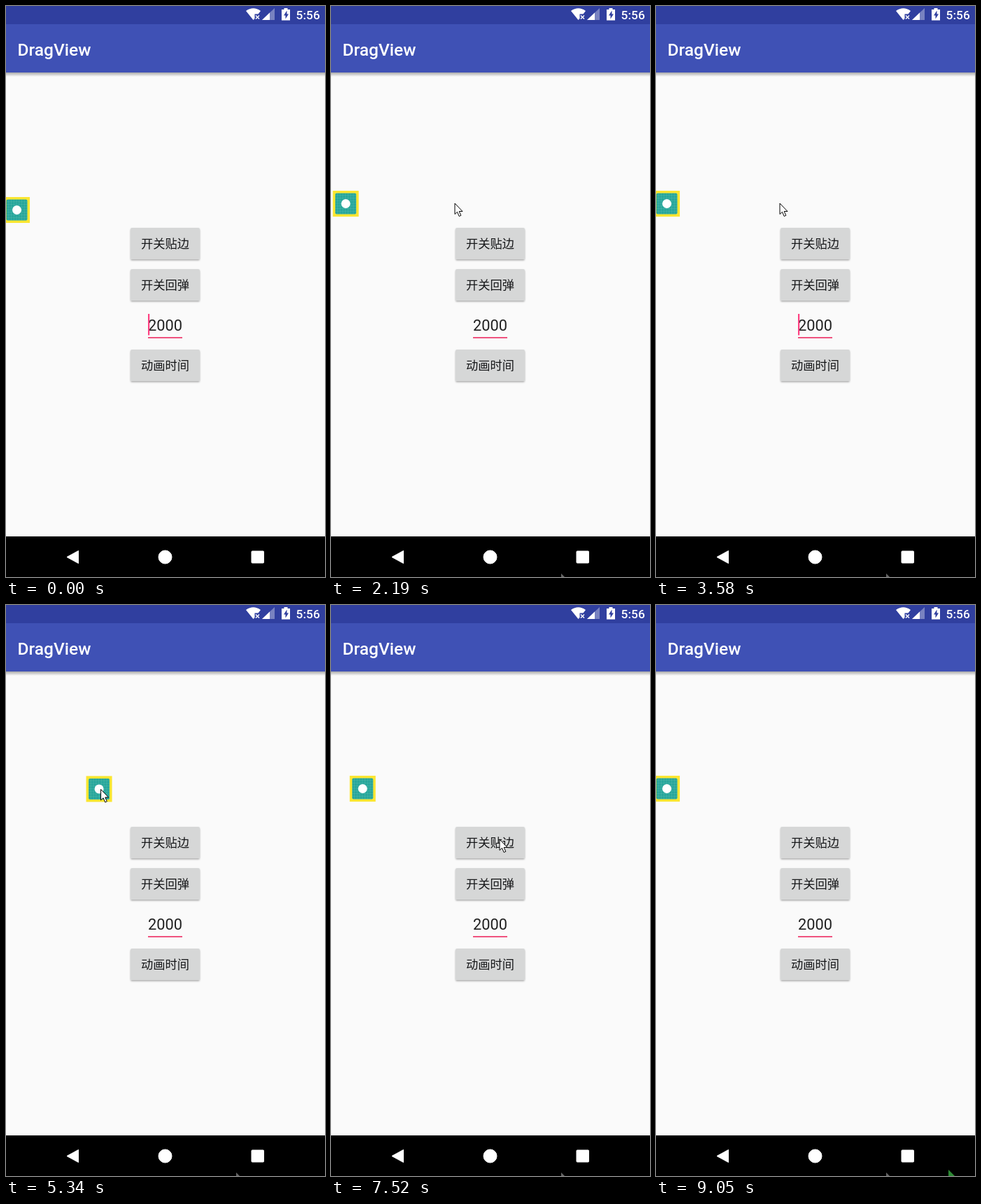
These frames come from a looping animation (456x816 px, 9330 ms). An HTML page:

```html
<!DOCTYPE html>
<html lang="zh">
<head>
<meta charset="utf-8">
<title>DragView</title>
<style>
  html, body { margin: 0; width: 100%; height: 100%; overflow: hidden; background: #fafafa; }
  svg { display: block; width: 456px; height: 816px; font-family: Roboto, sans-serif; }
  .label { font: 17.25px "Noto Sans CJK SC", "Noto Sans CJK", sans-serif; fill: #17181a; text-anchor: middle; }
</style>
</head>
<body>
<svg viewBox="0 0 456 816">
  <defs>
    <linearGradient id="shade" x2="0" y2="1">
      <stop stop-color="#000" stop-opacity=".32"/>
      <stop offset="1" stop-color="#000" stop-opacity="0"/>
    </linearGradient>
    <filter id="lift" x="-10%" y="-10%" width="120%" height="130%">
      <feDropShadow dx="0" dy="1.5" stdDeviation="1" flood-opacity=".32"/>
    </filter>
    <pattern id="grid" width="3.75" height="3.75" patternUnits="userSpaceOnUse" x="3.5" y="3.5">
      <path d="M3.75 0V3.75H0" fill="none" stroke="#fff" stroke-opacity=".28" stroke-width=".6"/>
    </pattern>
  </defs>

  <rect width="456" height="816" fill="#fafafa"/>
  <rect y="95" width="456" height="6" fill="url(#shade)"/>
  <rect width="456" height="95" fill="#3f51b5"/>
  <rect width="456" height="26" fill="#303f9f"/>
  <text x="16.5" y="71" font-size="24.5" font-weight="500" fill="#fff">DragView</text>

  <g fill="#fff">
    <path d="M343 7Q353.500-.5 364 7L360.500 11.500H355.500V18L353.500 20Z"/>
    <path d="M357 13.500l5 5m0-5l-5 5" stroke="#fff" stroke-width="1.500"/>
    <path d="M384 3V20H366Z" opacity=".35"/>
    <path d="M377 9.600V20H366Z"/>
    <path d="M394 5h3.500V3h5v2H406v15.500H394Z"/>
    <path d="M401.500 6.500l-4.500 7h2.500v5l4.500-7h-2.500Z" fill="#303f9f"/>
    <text x="414.500" y="19" font-size="17.4" font-weight="500">5:56</text>
  </g>

  <g id="buttons"></g>
  <rect id="press" x="178" y="317" width="99" height="45" rx="2" opacity="0"/>

  <text x="203" y="464" font-size="21.8" fill="#202020">2000</text>
  <rect x="203" y="473" width="49" height="2" fill="#f0527f"/>
  <rect id="caret" x="203" y="440" width="2.200" height="30.500" fill="#ff4081"/>

  <rect y="758" width="456" height="58"/>
  <g fill="#fff" stroke="#fff" stroke-linejoin="round">
    <path d="M87 787.500L103.500 778.500V796.500Z"/>
    <circle cx="227.500" cy="787.500" r="9.500"/>
    <rect x="351" y="779" width="17.500" height="17" rx="1"/>
  </g>
  <path id="entryMark" d="M329 811V816H334Z" fill="#666"/>
  <path id="exitMark" d="M418 807V816H427Z" fill="#2d8a35"/>

  <g id="view">
    <rect width="37" height="37" fill="#fbe631"/>
    <rect x="3.500" y="3.500" width="30" height="30" rx="2" fill="#26a69a"/>
    <rect x="3.500" y="3.500" width="30" height="30" rx="2" fill="url(#grid)"/>
    <circle cx="18.500" cy="18.500" r="6.500" fill="#fff"/>
  </g>
  <path id="pointer" d="M0 0V15.500L3.500 12.300L6.200 18.500L8.800 17.300L6.200 11.500H11Z"
        fill="#fff" stroke="#000" stroke-linejoin="round"/>
</svg>
<script>
const LOOP = 9330, BOUNCE_TIME = 2000, EDGE = -3;
const $ = id => document.getElementById(id);

$('buttons').innerHTML = [['开关贴边', 317], ['开关回弹', 376], ['动画时间', 491]].map(([label, y]) =>
  `<rect x="178" y="${y}" width="99" height="45" rx="2" fill="#d6d7d7" filter="url(#lift)"/>
   <text class="label" x="227.5" y="${y + 28.5}">${label}</text>`).join('');

// Pointer stops: time, x, y
const stops = [
  [30, 329, 811], [800, 14, 291], [1290, 177, 282], [4040, 177, 282],
  [4400, 256, 338], [4500, 256, 338], [4920, 18, 283], [5380, 138, 263],
  [5800, 138, 263], [6230, 241, 335], [7540, 241, 335], [8410, 411, 754], [8700, 418, 807]
];
const clamp = (v, lo, hi) => Math.min(hi, Math.max(lo, v));

function pointerAt(t) {
  t = clamp(t, stops[0][0], stops.at(-1)[0]);
  const i = Math.max(1, stops.findIndex(s => s[0] >= t));
  const [t0, x0, y0] = stops[i - 1], [t1, x1, y1] = stops[i];
  const p = (t - t0) / (t1 - t0), e = p * p * (3 - 2 * p);
  return [x0 + (x1 - x0) * e, y0 + (y1 - y0) * e];
}

function bounce(p) {
  const u = clamp(p, 0, 1) * 1.1226;
  if (u < 0.3535) return 8 * u * u;
  if (u < 0.7408) return 8 * (u - 0.54719) ** 2 + 0.7;
  if (u < 0.9644) return 8 * (u - 0.8526) ** 2 + 0.9;
  return 8 * (u - 1.0435) ** 2 + 0.95;
}

// Follow the pointer from grab to drop, then bounce to the left edge
function dragAt(t, { grab, drop, dx, dy }) {
  const [px, py] = pointerAt(clamp(t, grab, drop));
  const x = px - dx;
  return [x + (EDGE - x) * bounce((t - drop) / BOUNCE_TIME), py - dy];
}
const drags = [
  { grab: 800, drop: 1572, dx: 17, dy: 18 },
  { grab: 4920, drop: 6690, dx: 21, dy: 19 }
];
// The second drag lets go before the pointer leaves; snapping waits for the button
function viewAt(t) {
  const [first, second] = drags;
  if (t < second.grab) return dragAt(t, first);
  const [x, y] = dragAt(Math.min(t, 5700), second);
  return [x + (EDGE - x) * bounce((t - second.drop) / BOUNCE_TIME), y];
}

const place = (el, [x, y]) => el.setAttribute('transform', `translate(${x} ${y})`);
const show = (el, on) => el.setAttribute('visibility', on ? 'visible' : 'hidden');

function draw(now) {
  const t = now % LOOP, blink = t % 1000;
  place($('view'), viewAt(t));
  place($('pointer'), pointerAt(t));
  show($('pointer'), t >= 30 && t < 8700);
  show($('caret'), blink < 40 || blink >= 565);
  show($('entryMark'), t >= 30);
  show($('exitMark'), t >= 8700);
  $('press').setAttribute('opacity', 0.1 * Math.sin(Math.PI * clamp((t - 6540) / 450, 0, 1)));
  requestAnimationFrame(draw);
}
requestAnimationFrame(draw);
</script>
</body>
</html>
```
